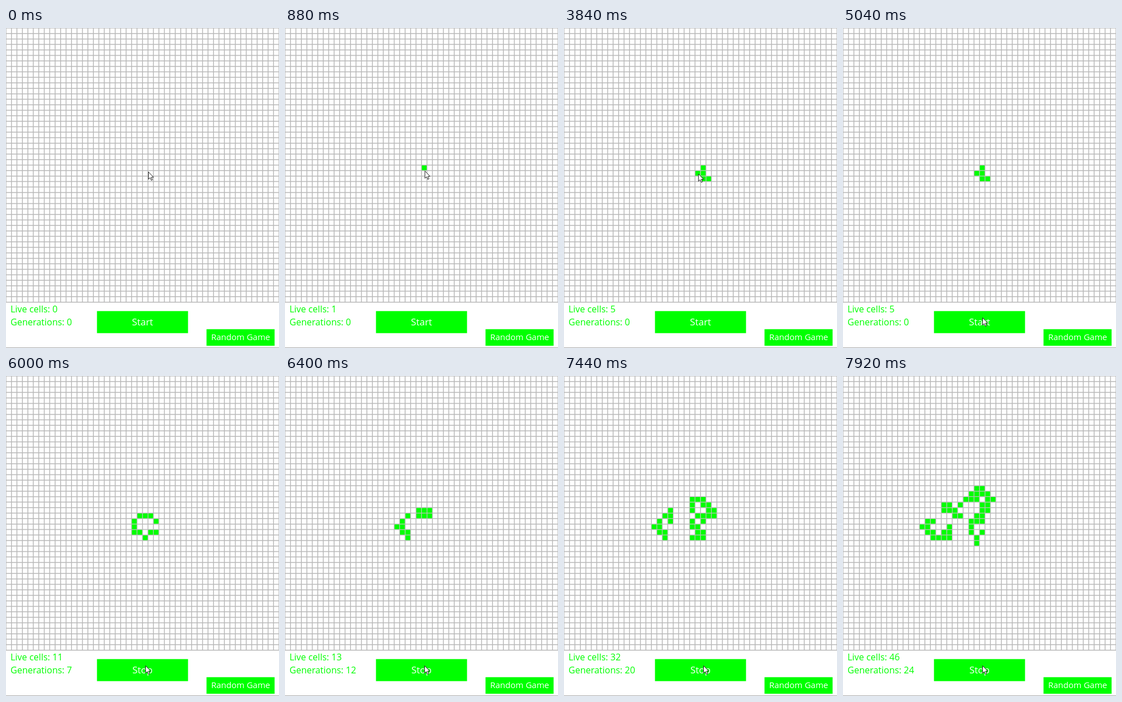
These frames come from a looping animation (484 px wide and 566 px high, 8000 ms). An HTML page with a canvas:

```html
<!DOCTYPE html>
<html lang="en">
<head>
<meta charset="utf-8">
<title>Game of Life</title>
<style>
html, body { margin: 0; width: 100%; height: 100%; overflow: hidden; background: #fff; }
canvas { display: block; }
</style>
</head>
<body>
<canvas id="stage" width="484" height="566"></canvas>
<script>
const ctx = document.getElementById('stage').getContext('2d');
const LOOP = 8000, STEP = 80, START = 5440;
const N = 50, W = 484 / N, H = 485 / N;
const GREEN = '#00ff00', GRAY = '#b9b9b9';

// The pointer visits one cell per beat, clicks it, then glides to the next stop.
const BEAT = 820, GLIDE = 320, CLICK = 480;
const seed = [[25, 25], [25, 26], [25, 27], [26, 27], [24, 26]];
const stops = [
  [252, 254],
  ...seed.map(([x, y]) => [(x + 0.5) * W + 0.7, (y + 0.5) * H + 0.5]),
  [247, 512]
];
const arrow = new Path2D('M.5 .5v13l3-2.7 2.2 4.7 2-1-2-4.5h3.8z');

function evolve(cells) {
  const alive = new Set(cells.map(String)), counts = {};
  for (const [x, y] of cells)
    for (let dx = -1; dx <= 1; dx++)
      for (let dy = -1; dy <= 1; dy++)
        if (dx || dy) {
          const key = [x + dx, y + dy];
          counts[key] = (counts[key] || 0) + 1;
        }
  return Object.keys(counts)
    .filter(k => counts[k] === 3 || (counts[k] === 2 && alive.has(k)))
    .map(k => k.split(',').map(Number));
}

const history = [seed];
for (let g = 0; g < 24; g++) history.push(evolve(history[g]));

// One generation per step, slower once the pattern has grown.
function generationAt(t) {
  return Math.max(0, Math.floor(Math.min((t - START) / STEP, 16 + (t - 6720) / 150)));
}

function pointerAt(t) {
  const leg = Math.min(Math.floor(t / BEAT), stops.length - 2);
  const u = Math.min(1, (t - leg * BEAT) / GLIDE), ease = 1 - (1 - u) ** 3;
  const [x0, y0] = stops[leg], [x1, y1] = stops[leg + 1];
  return [x0 + (x1 - x0) * ease, y0 + (y1 - y0) * ease];
}

function box(x, y, w, h, color) {
  ctx.fillStyle = color;
  ctx.fillRect(x, y, w, h);
}

function label(text, x, y, color, size = 16, align = 'left') {
  ctx.font = `500 ${size}px "Comic Sans MS", "Open Sans", sans-serif`;
  ctx.textAlign = align;
  ctx.fillStyle = color;
  ctx.fillText(text, x, y);
}

function drawGrid() {
  ctx.strokeStyle = GRAY;
  ctx.lineWidth = 1.5;
  ctx.beginPath();
  for (let i = 0; i <= N; i++) {
    ctx.moveTo(i * W, 0);
    ctx.lineTo(i * W, N * H);
    ctx.moveTo(0, i * H);
    ctx.lineTo(N * W, i * H);
  }
  ctx.stroke();
}

function drawPointer(x, y) {
  ctx.save();
  ctx.translate(x, y);
  ctx.fillStyle = '#fff';
  ctx.fill(arrow);
  ctx.strokeStyle = '#222';
  ctx.lineWidth = 1;
  ctx.stroke(arrow);
  ctx.restore();
}

function draw(now) {
  const t = Math.floor(now % LOOP / STEP) * STEP;
  const gen = generationAt(t);
  const clicked = Math.floor((t - CLICK) / BEAT) + 1;
  const cells = history[gen].slice(0, t < START ? Math.max(0, clicked) : undefined);

  box(0, 0, 484, 566, '#fff');
  drawGrid();
  for (const [x, y] of cells) box(x * W + 0.6, y * H + 0.6, W - 1.2, H - 1.2, GREEN);

  box(0, 565, 484, 1, '#aaa');
  label('Live cells: ' + cells.length, 8, 503, GREEN);
  label('Generations: ' + gen, 8, 526, GREEN);
  box(161.3, 500.7, 161.4, 39, GREEN);
  label(t < START ? 'Start' : 'Stop', 242, 526, '#fff', 17, 'center');
  box(355.5, 532.7, 120.7, 29.3, GREEN);
  label('Random Game', 416, 552, '#fff', 15, 'center');

  drawPointer(...pointerAt(t));
  requestAnimationFrame(draw);
}
requestAnimationFrame(draw);
</script>
</body>
</html>
```
